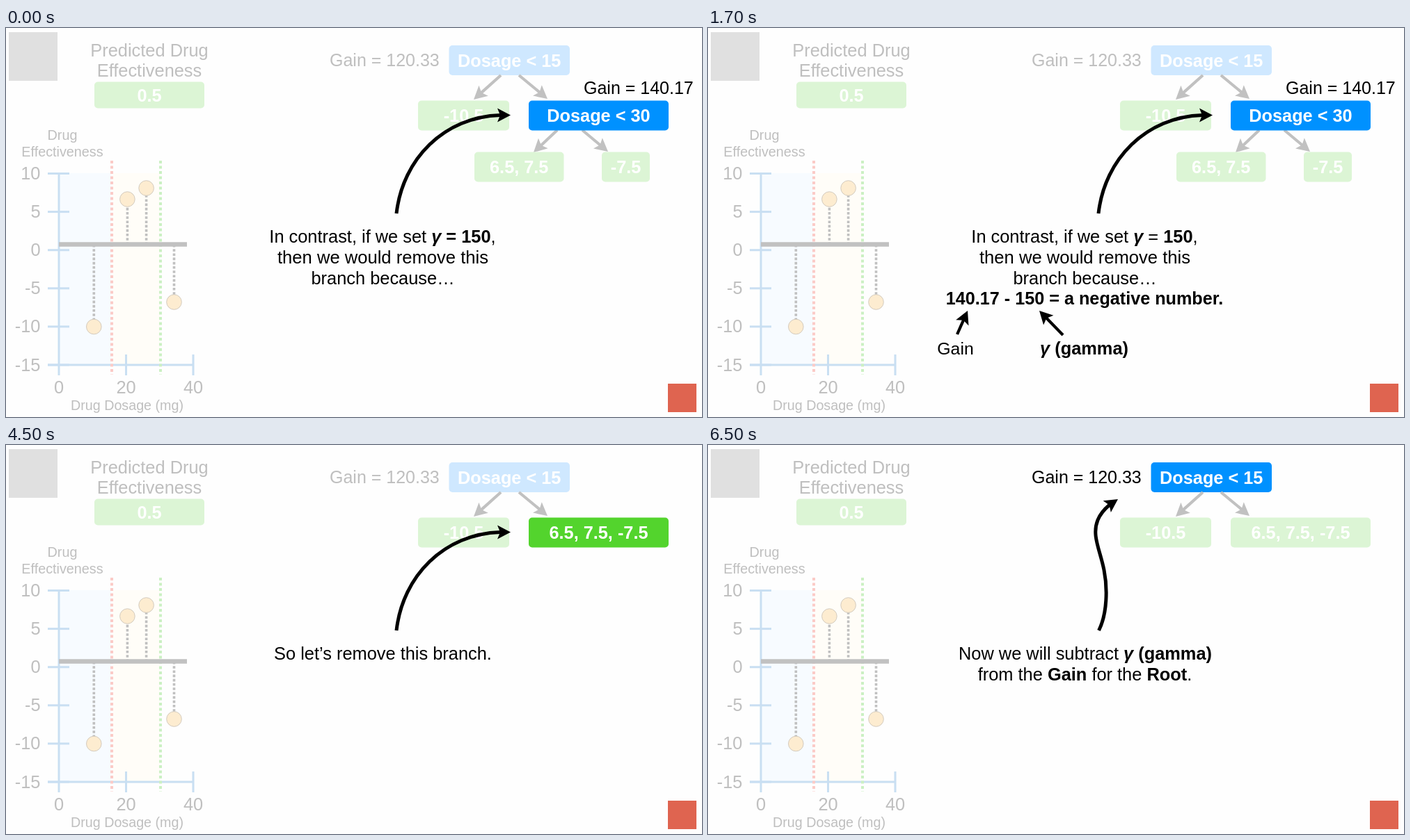
Animation of 1000x560 px, one loop 8 s. Source, as an HTML page:

```html
<!DOCTYPE html>
<html lang="en">
<head>
<meta charset="utf-8">
<title>Pruning a regression tree</title>
<style>
  html, body { margin: 0; width: 100%; height: 100%; overflow: hidden; background: #fefefe; }
  svg { display: block; width: 1000px; height: 560px; }
  text { font-family: "Liberation Sans", Arial, sans-serif; }
  .b { font-weight: bold; }
  .i { font-weight: bold; font-style: italic; }
</style>
</head>
<body>
<svg id="stage" viewBox="0 0 1000 560"></svg>
<script>
const BLACK = '#000', GRAY = '#bfbfbf', LINE = '#c1c1c1', AXIS = '#c9dff2';
const BLUE = ['#cfe8ff', '#0091ff'], GREEN = ['#dcf5d5', '#53d42d'];
const LOOP = 8000, CUTS = [500, 2500, 4500, 6500];

const text = (x, y, str, { fill = BLACK, size = 25.4, anchor = 'middle', cls = '' } = {}) =>
  `<text x="${x}" y="${y}" fill="${fill}" font-size="${size}" text-anchor="${anchor}" class="${cls}">${str}</text>`;
const faint = (x, y, str, opts) => text(x, y, str, { fill: GRAY, ...opts });
const bold = str => `<tspan class="b">${str}</tspan>`;
const gamma = '<tspan class="i">γ</tspan>';

const rect = (x, y, w, h, fill, r = 0) =>
  `<rect x="${x}" y="${y}" width="${w}" height="${h}" rx="${r}" fill="${fill}"/>`;
const box = (x, y, w, h, str, fill) =>
  rect(x, y, w, h, fill, 5) + text(x + w / 2, y + h / 2 + 9, str, { fill: '#fff', size: 25.3, cls: 'b' });
const line = (x1, y1, x2, y2, color, width, dash = '') =>
  `<path d="M${x1} ${y1}L${x2} ${y2}" stroke="${color}" stroke-width="${width}" stroke-dasharray="${dash}"/>`;

const head = (x, y, deg, color) =>
  `<path d="M0 0L-19 -10L-15 0L-19 10Z" fill="${color}" transform="translate(${x} ${y}) rotate(${deg})"/>`;
const curve = (d, x, y, deg) =>
  `<path d="${d}" fill="none" stroke="#000" stroke-width="5"/>` + head(x, y, deg, BLACK);
function arrow(x1, y1, x2, y2, color = BLACK) {
  const a = Math.atan2(y2 - y1, x2 - x1);
  return line(x1, y1, x2 - 14 * Math.cos(a), y2 - 14 * Math.sin(a), color, 4.2) +
    head(x2, y2, a * 180 / Math.PI, color);
}

function chart() {
  let s = rect(76, 209, 75, 276, '#f7fbff') + rect(154, 209, 67, 276, '#fffdf8');
  s += line(76, 208, 76, 500, AXIS, 3) + line(60, 485, 270, 485, AXIS, 3);
  for (let i = 0; i < 6; i++) {
    const y = 209.5 + i * 55.1;
    s += line(60, y, 91, y, AXIS, 3) + faint(49.5, y + 8.5, 10 - 5 * i, { anchor: 'end' });
  }
  for (let i = 0; i < 3; i++) {
    const x = 76 + i * 96.5;
    if (i) s += line(x, 470, x, 500, AXIS, 3);
    s += faint(x, 526, 20 * i);
  }
  s += line(152, 191, 152, 499, '#fbcbc7', 4, '4 3.5') + line(222, 191, 222, 499, '#cbf0c3', 4, '4 3.5');
  for (const [x, y] of [[126.3, 430], [174.4, 246.5], [201.6, 230.5], [241.5, 394.5]])
    s += line(x, 312, x, y, '#c0c0c0', 3.6, '3.6 2.6') +
      `<circle cx="${x}" cy="${y}" r="10.8" fill="#fdecd0" stroke="#d3cbbf"/>`;
  return s + line(76, 311.5, 260, 311.5, LINE, 6.5) +
    faint(81, 161, 'Drug', { size: 19.8 }) + faint(81, 185, 'Effectiveness', { size: 19.8 }) +
    faint(174, 550, 'Drug Dosage (mg)', { size: 19.7 });
}

const backdrop = rect(4, 6, 70, 70, '#e0e0e0') + rect(951, 512, 41, 41, '#df6450') +
  faint(206, 40.5, 'Predicted Drug') + faint(206, 70, 'Effectiveness') +
  box(127, 77.5, 158, 38, '0.5', GREEN[0]) + chart();

function tree(step) {
  const root = step === 4, leaves = step === 2;
  let s = text(465, 55, 'Gain = 120.33', { fill: root ? BLACK : GRAY, size: 25, anchor: 'start' }) +
    box(636.5, 25, 173.5, 43, 'Dosage &lt; 15', BLUE[+root]) +
    arrow(711, 68, 672, 103, LINE) + arrow(737, 68, 778, 102, LINE) +
    box(592, 104.5, 131, 43, '-10.5', GREEN[0]);
  if (step > 2) return s + box(751, 104.5, 201, 43, '6.5, 7.5, -7.5', GREEN[+!root]);
  const color = leaves ? BLACK : LINE;
  if (!leaves) s += text(830, 95, 'Gain = 140.17', { size: 25, anchor: 'start' });
  return s + arrow(792, 147, 758, 179, color) + arrow(828, 147, 865, 178, color) +
    box(751, 104.5, 201, 43, 'Dosage &lt; 30', BLUE[1]) +
    box(673, 178.5, 128.5, 43, '6.5, 7.5', GREEN[+leaves]) +
    box(856, 178.5, 69, 43, '-7.5', GREEN[+leaves]);
}

function caption(step) {
  if (step === 4)
    return curve('M561.5 267C574 242 574 205 569 180C563 150 551 130 560 108C564 98 570 92 577 86', 589, 78, -34) +
      text(542, 309, `Now we will subtract ${gamma} ${bold('(gamma)')}`) +
      text(541.5, 339, `from the ${bold('Gain')} for the ${bold('Root')}.`);
  const sweep = curve('M561 267C570 188 630 128 710 125.5', 725, 125.5, 0);
  if (step > 1) return sweep + text(541.5, 308.5, 'So let’s remove this branch.');
  const equals = step ? ` = ${bold('150')}` : bold(' = 150');
  let s = sweep + text(541, 309, `In contrast, if we set ${gamma}${equals},`) +
    text(541.5, 339, 'then we would remove this', { size: 25.6 }) +
    text(541.5, 369, 'branch because…');
  if (step) s += text(541, 398, '140.17 - 150 = a negative number.', { size: 25.2, cls: 'b' }) +
    arrow(358, 441, 373, 407) + arrow(510, 442, 476, 407) +
    text(355.5, 470, 'Gain', { size: 24.8 }) + text(540.5, 470, `${gamma} ${bold('(gamma)')}`);
  return s;
}

const stage = document.getElementById('stage');
let shown = -1;
function tick() {
  const t = performance.now() % LOOP;
  const step = CUTS.filter(cut => t >= cut).length;
  if (step !== shown) {
    stage.innerHTML = backdrop + tree(step) + caption(step);
    shown = step;
  }
  requestAnimationFrame(tick);
}
tick();
</script>
</body>
</html>
```
